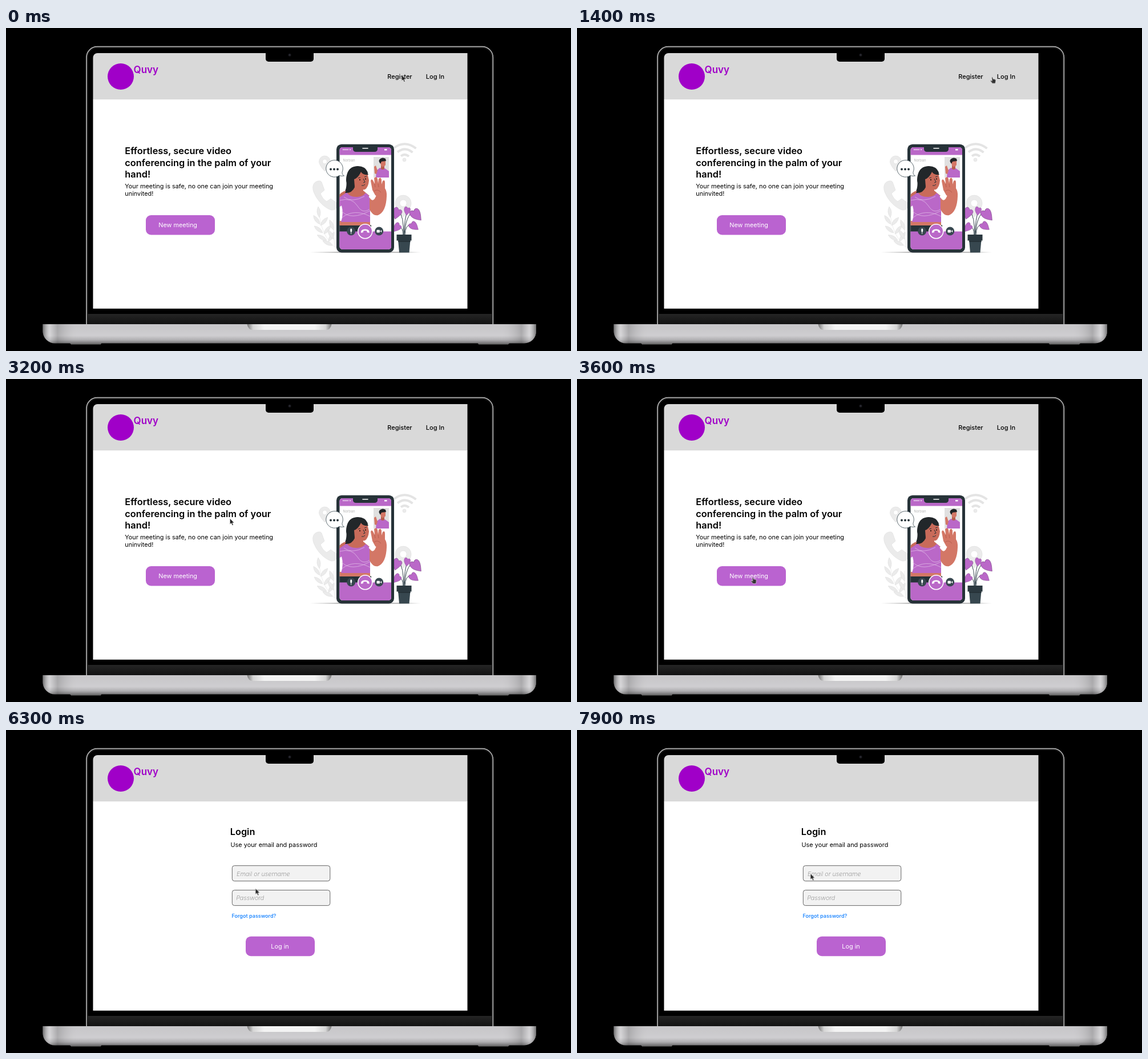
These frames come from a looping animation (990 px wide and 566 px high, 8 s). An HTML page:

```html
<!DOCTYPE html>
<html lang="en">
<head>
<meta charset="utf-8">
<title>Video meeting prototype</title>
<style>
html, body { margin: 0; width: 100%; height: 100%; overflow: hidden; background: #000; }
svg { display: block; }
text { font: 400 10.88px Inter, sans-serif; fill: #000; }
.title { font-size: 16.35px; font-weight: 600; }
.nav { font-size: 11px; font-weight: 500; }
.light { fill: #fff; }
.hint { font-weight: 200; font-style: italic; fill: #777; }
.link { font-size: 9.1px; font-weight: 500; fill: #0a7cff; }
.brand { font-size: 17px; font-weight: 600; fill: #a000c8; }
.tiny { font-size: 5.6px; fill: #b5b5b5; }

#home, #login, #cursor, #arrow, #hand { animation: 8s step-end -10ms infinite; }
#home { animation-name: leave; }
#login { animation-name: enter; }
#cursor { animation-name: travel; }
#arrow { animation-name: arrow; }
#hand { animation-name: hand; }
@keyframes leave { 0% { visibility: visible } 66.25%, 100% { visibility: hidden } }
@keyframes enter { 0% { visibility: hidden } 66.25%, 100% { visibility: visible } }
@keyframes arrow {
  0%, 28.75%, 66.25% { visibility: visible }
  8.75%, 43.75% { visibility: hidden }
  100% { visibility: visible }
}
@keyframes hand {
  0%, 28.75%, 66.25% { visibility: hidden }
  8.75%, 43.75% { visibility: visible }
  100% { visibility: hidden }
}
@keyframes travel {
  0% { transform: translate(693px, 82px) }
  5% { transform: translate(684px, 97px) }
  6.25% { transform: translate(676px, 106px) }
  7.5% { transform: translate(688px, 96px) }
  8.75% { transform: translate(690px, 87px) }
  10% { transform: translate(690.5px, 80.5px) }
  12.5% { transform: translate(690px, 81px) }
  15% { transform: translate(694px, 82px) }
  16.25% { transform: translate(708px, 84px) }
  17.5% { transform: translate(724px, 85.5px) }
  18.75% { transform: translate(737px, 86px) }
  20% { transform: translate(742px, 84px) }
  27.5% { transform: translate(738px, 85px) }
  28.75% { transform: translate(560px, 160px) }
  30% { transform: translate(392px, 244px) }
  41.25% { transform: translate(309.5px, 348.5px) }
  43.75% { transform: translate(311px, 348px) }
  45% { transform: translate(304.5px, 347px) }
  66.25% { transform: translate(307px, 348.5px) }
  78.75% { transform: translate(436.7px, 277.3px) }
  81.25% { transform: translate(439.5px, 276px) }
  83.75% { transform: translate(452.3px, 256px) }
  88.75% { transform: translate(453.5px, 251px) }
  91.25% { transform: translate(453px, 250.5px) }
  97.5% { transform: translate(424px, 254.5px) }
  98.75%, 100% { transform: translate(408.7px, 251.3px) }
}
</style>
</head>
<body>
<svg width="990" height="566" viewBox="0 0 990 566">
  <defs>
    <linearGradient id="metal" x2="0" y2="1">
      <stop stop-color="#c2c1c4"/><stop offset=".3" stop-color="#c6c5c8"/>
      <stop offset=".6" stop-color="#cbcacd"/><stop offset=".82" stop-color="#aaa9ac"/>
      <stop offset="1" stop-color="#6a696b"/>
    </linearGradient>
    <linearGradient id="ends">
      <stop stop-color="#333" stop-opacity=".6"/><stop offset=".014" stop-color="#fff" stop-opacity=".25"/>
      <stop offset=".03" stop-color="#555" stop-opacity=".25"/><stop offset=".07" stop-color="#fff" stop-opacity=".08"/>
      <stop offset=".93" stop-color="#fff" stop-opacity=".08"/><stop offset=".97" stop-color="#555" stop-opacity=".25"/>
      <stop offset=".986" stop-color="#fff" stop-opacity=".25"/><stop offset="1" stop-color="#333" stop-opacity=".6"/>
    </linearGradient>
    <linearGradient id="dip">
      <stop stop-color="#777"/><stop offset=".07" stop-color="#d5d5d5"/><stop offset=".2" stop-color="#f3f3f3"/>
      <stop offset=".8" stop-color="#f3f3f3"/><stop offset=".93" stop-color="#d5d5d5"/><stop offset="1" stop-color="#777"/>
    </linearGradient>
    <linearGradient id="hinge" x2="0" y2="1"><stop stop-color="#252525"/><stop offset="1" stop-color="#111"/></linearGradient>
    <linearGradient id="ground">
      <stop stop-color="#888" stop-opacity="0"/><stop offset=".25" stop-color="#777"/>
      <stop offset=".8" stop-color="#777"/><stop offset="1" stop-color="#888" stop-opacity="0"/>
    </linearGradient>
    <clipPath id="glass"><rect x="584.5" y="209" width="90.5" height="179" rx="5"/></clipPath>
    <clipPath id="thumb"><rect x="644" y="226" width="27" height="36"/></clipPath>
    <path id="shell" d="M64.500 519H929V531A21 21 0 0 1 908 552.500H86A21 21 0 0 1 64.500 531Z"/>
    <path id="leaf" d="M0 0C-3-5-9-4-9 2-9 9-4 14 2 19 5 13 8 8 8 3 8-3 2-4 0 0Z"/>
    <path id="sprig" d="M0 0Q-7-9-2-19Q5-10 0 0Z"/>
  </defs>

  <!-- laptop -->
  <path d="M141 520V52A19 19 0 0 1 160 32.700H834A19 19 0 0 1 853.300 52V520Z" stroke="#b5b5b5" stroke-width="1.7"/>
  <path d="M143 519V52A17 17 0 0 1 160 34.800H834A17 17 0 0 1 851.300 52V519" fill="none" stroke="#333" stroke-width=".8"/>
  <rect x="143" y="501" width="708" height="19" fill="url(#hinge)"/>
  <path d="M152.500 125H808.500V491.700H152.500Z" fill="#fff"/>
  <path d="M152.500 125.300V52A8 8 0 0 1 160.500 44H808.500V125.300Z" fill="#d9d9d9"/>
  <path d="M455 43V54A5 5 0 0 0 460 59H534A5 5 0 0 0 539 54V43Z"/>
  <circle cx="497" cy="47.300" r="2.500" fill="#1b1b20"/><circle cx="497" cy="47.300" r="1" fill="#30303a"/>
  <path d="M111 551H168L166 554.500H114ZM826 551H883L880 554.500H828Z" fill="#6f6f6f"/>
  <use href="#shell" fill="url(#metal)"/>
  <use href="#shell" fill="url(#ends)"/>
  <path d="M422.500 519H570.500Q569 529 560 529H433Q424 529 422.500 519Z" fill="url(#dip)"/>

  <circle cx="201" cy="85" r="23" fill="#a000c8"/>
  <text class="brand" x="223.500" y="79.300">Quvy</text>

  <g id="home">
    <text class="nav" x="668.300" y="89">Register</text>
    <text class="nav" x="735.800" y="89">Log In</text>
    <text class="title" x="208.300" y="221.400">Effortless, secure video</text>
    <text class="title" x="208.300" y="241.600">conferencing in the palm of your</text>
    <text class="title" x="208.300" y="261.700">hand!</text>
    <text x="208.300" y="280.500">Your meeting is safe, no one can join your meeting</text>
    <text x="208.300" y="293.800">uninvited!</text>
    <rect x="245" y="328" width="121" height="34.500" rx="9" fill="#ba63d0"/>
    <text class="light" x="267.200" y="349">New meeting</text>

    <!-- pale background objects -->
    <g fill="#ebebeb" stroke="#dedede" stroke-width=".6">
      <path d="M558.500 224a10 10 0 0 1 10 10c0 7-10 17-10 17s-10-10-10-17a10 10 0 0 1 10-10Zm0 6a4 4 0 1 0 .1 0Z"/>
      <path d="M547 268C538 270 536 278 539 287 545 303 558 315 570 319 577 320 582 313 580 307L569 299 562 304C557 301 553 296 551 290L558 284 553 270Q551 267 547 268Z"/>
      <path d="M696 293a14 14 0 0 1 14 14c0 11-14 24-14 24s-14-13-14-24a14 14 0 0 1 14-14Zm0 8a6 6 0 1 0 .1 0Z"/>
      <path d="M680 210Q699 196 718.500 211M686 217.500Q699 207 712.500 218M692 224.500Q699 219 706 225" fill="none" stroke="#e4e4e4" stroke-width="4"/>
      <circle cx="698" cy="231" r="3"/>
      <path d="M579 386Q551 365 548 318M578 386Q572 370 574 336" fill="none" stroke="#e2e2e2"/>
      <use href="#sprig" x="549" y="332"/>
      <use href="#sprig" transform="translate(550 344) rotate(-30)"/>
      <use href="#sprig" transform="translate(551 346) rotate(48)"/>
      <use href="#sprig" transform="translate(555 359) rotate(-45)"/>
      <use href="#sprig" transform="translate(557 361) rotate(45)"/>
      <use href="#sprig" transform="translate(562 372) rotate(-55)"/>
      <use href="#sprig" transform="translate(565 374) rotate(38)"/>
      <use href="#sprig" transform="translate(572 381) rotate(-58)"/>
      <use href="#sprig" transform="translate(574 354) rotate(-15)"/>
      <use href="#sprig" transform="translate(574 370) rotate(-25)"/>
    </g>
    <rect x="533" y="392.500" width="194" height="1" fill="url(#ground)"/>

    <!-- plant -->
    <path d="M697 363Q698 335 704 317M698 363Q700 329 714 321M696 363Q698 330 687 319M696 363Q696 350 688 347M699 363Q699 345 711 343" fill="none" stroke="#37474f"/>
    <g fill="#ba68c8" stroke="#6d3a79" stroke-width=".5">
      <use href="#leaf" transform="translate(704 316) rotate(15) scale(.65)"/>
      <use href="#leaf" transform="translate(715 321) rotate(-32) scale(1.05)"/>
      <use href="#leaf" transform="translate(688 319) rotate(28) scale(.9)"/>
      <use href="#leaf" transform="translate(689 346) rotate(48) scale(.75)"/>
      <use href="#leaf" transform="translate(711 343) rotate(-42) scale(.8)"/>
    </g>
    <path d="M687 371H708.500L706.500 393.500H689Z" fill="#37474f"/>
    <path d="M684.500 362H710.500V372.500H684.500Z" fill="#2b383f"/>
    <path d="M687 372.500H708.500V375H687.300Z" fill="#263238"/>

    <!-- phone -->
    <rect x="579" y="203.700" width="101" height="189.800" rx="9" fill="#263238"/>
    <g clip-path="url(#glass)">
      <path d="M584 209H676V389H584Z" fill="#fff"/>
      <path d="M584 209H676V222.500H584Z" fill="#ba68c8"/>
      <path d="M608 208H651V213Q650 217 646 217H613Q609 217 608 213Z" fill="#263238"/>
      <path d="M625 210.800H634" stroke="#fff" stroke-width="1.500" stroke-linecap="round"/>
      <path d="M590 213.200H600" stroke="#fff" stroke-width="1.500" stroke-dasharray="1.500 .7"/>
      <path d="M601.500 212.500H604.500L603 214.500ZM663 212H667.500V214.500H663Z" fill="#fff"/>
      <text class="tiny" x="590.500" y="234">Norbian</text>

      <g clip-path="url(#thumb)">
        <path d="M644 226H671V262H644Z" fill="#e0e0e0"/>
        <path d="M648 262L649 250 655 245 664 246 671 251V262Z" fill="#ba68c8"/>
        <path d="M657 241H663V247Q660 249 657 247Z" fill="#b85d4e"/>
        <path d="M655 232Q660 229 665 233L665 240Q661 246 657 241Z" fill="#d37766"/>
        <path d="M656 238Q651 232 656 229 660 226 665 229L666 233 658 234Z" fill="#202426"/>
        <path d="M645 243L648 241 651 250 649 256 646 255Z" fill="#d37766"/>
      </g>

      <path d="M584 345.500H640V357H584Z" fill="#263238"/>
      <path d="M584 338H638V346H584Z" fill="#d37766"/>
      <!-- hair behind the neck, then body -->
      <path d="M593 288Q598 279 596 266 597 243 615 242 629 241 634 253L622 282 612 288Q602 294 593 288Z" fill="#22272a"/>
      <path d="M584 292Q592 283 604 285L608 276H625L626 285 637 294 616 303 584 312Z" fill="#c96b5a"/>
      <path d="M584 297L597 288Q603 297 616 296 626 295 630 289L635 293Q640 304 638 319V340H587Q592 325 588 311L584 314Z" fill="#ba68c8"/>
      <path d="M585 302Q606 296 616 312T640 315M589 332Q610 316 638 330M588 321Q605 338 638 320M592 296Q606 307 628 295" fill="none" stroke="#e4c3ea" stroke-width=".7"/>
      <path d="M637 297Q644 309 650 290L654 276Q668 277 667 295 666 322 652 328 643 330 637 318Z" fill="#d37766"/>
      <path d="M642 284L639 268Q640 263 643 267L646 273 645 263Q649 259 651 264L652 272 653 264Q657 260 658 266L658 274 660 268Q664 265 664 271L664 291Q655 299 647 293Z" fill="#d37766"/>
      <path d="M645 286Q651 281 657 288M646 273L647 279M652 273L653 279" fill="none" stroke="#a84d40" stroke-width=".6"/>
      <path d="M608 254Q620 247 633 254L636 267Q635 279 629 283 618 285 611 276L606 270Z" fill="#c96b5a"/>
      <path d="M594 289Q600 279 596 267 597 245 613 243L629 246 635 257Q625 258 622 252 617 263 610 265L611 279Q606 290 594 289Z" fill="#22272a"/>
      <path d="M617 263l4-1M628 261l4-1M623 276q4 1 6-2M626 264l3 6-3 1" fill="none" stroke="#263238"/>
      <circle cx="620" cy="266" r="1"/><circle cx="630" cy="264.500" r="1"/>

      <path d="M584 356.500H676V389H584Z" fill="#ba68c8"/>
    </g>
    <g fill="#37474f"><circle cx="604.700" cy="356" r="7.500"/><circle cx="653.700" cy="356" r="7.500"/></g>
    <circle cx="629.300" cy="356.300" r="12.500" fill="#ba68c8" stroke="#fff" stroke-width="1.600"/>
    <path d="M622 359Q621 352.500 629.300 352.500T636.600 359L632.500 358V355.500Q629.300 354.500 626.100 355.500V358Z" fill="#fff"/>
    <g fill="#fff">
      <rect x="603.300" y="351.500" width="2.900" height="6" rx="1.400"/>
      <path d="M604.300 357H605.200V361H604.300Z"/>
      <rect x="649.500" y="353.700" width="5.500" height="4.800" rx="1"/><path d="M655.500 356L658.200 354V358.300Z"/>
    </g>
    <path d="M589 252.500A14.800 14.800 0 1 0 584 258.500Q588 260 592.500 259 588.500 257 589 252.500Z" fill="#fff" stroke="#37474f" stroke-width=".8"/>
    <g fill="#263238"><circle cx="569" cy="247.500" r="2"/><circle cx="575" cy="247.500" r="2"/><circle cx="581" cy="247.500" r="2"/></g>
  </g>

  <g id="login">
    <text class="title" x="392.700" y="183.500">Login</text>
    <text x="393.500" y="204.800">Use your email and password</text>
    <g fill="#f2f2f2" stroke="#555" stroke-width=".9">
      <rect x="396.300" y="237.700" width="171.500" height="27" rx="4"/>
      <rect x="396.300" y="280.600" width="171.500" height="27" rx="4"/>
    </g>
    <text class="hint" x="404" y="255.600">Email or username</text>
    <text class="hint" x="403.200" y="298">Password</text>
    <text class="link" x="395.500" y="329.200">Forgot password?</text>
    <rect x="420" y="361.700" width="121" height="34.500" rx="9" fill="#ba63d0"/>
    <text class="light" x="464.300" y="382.700">Log in</text>
  </g>

  <g id="cursor" stroke="#fff" stroke-width=".6" stroke-linejoin="round">
    <path id="arrow" d="M.3.3V10.800L2.700 8.600 4.500 12.500 6.300 11.700 4.600 8H7.800Z" fill="#222"/>
    <path id="hand" d="M2.600 1Q3.500-.2 4.500 1L5.200 4Q6.200 3.200 7 4.200 8 3.600 8.600 4.700 9.900 4.500 10 6L9.500 9.300 8.800 11.700H4L.4 7.400Q.3 6 2 6.400L3.300 7.300Z" fill="#333"/>
  </g>
</svg>
</body>
</html>
```
